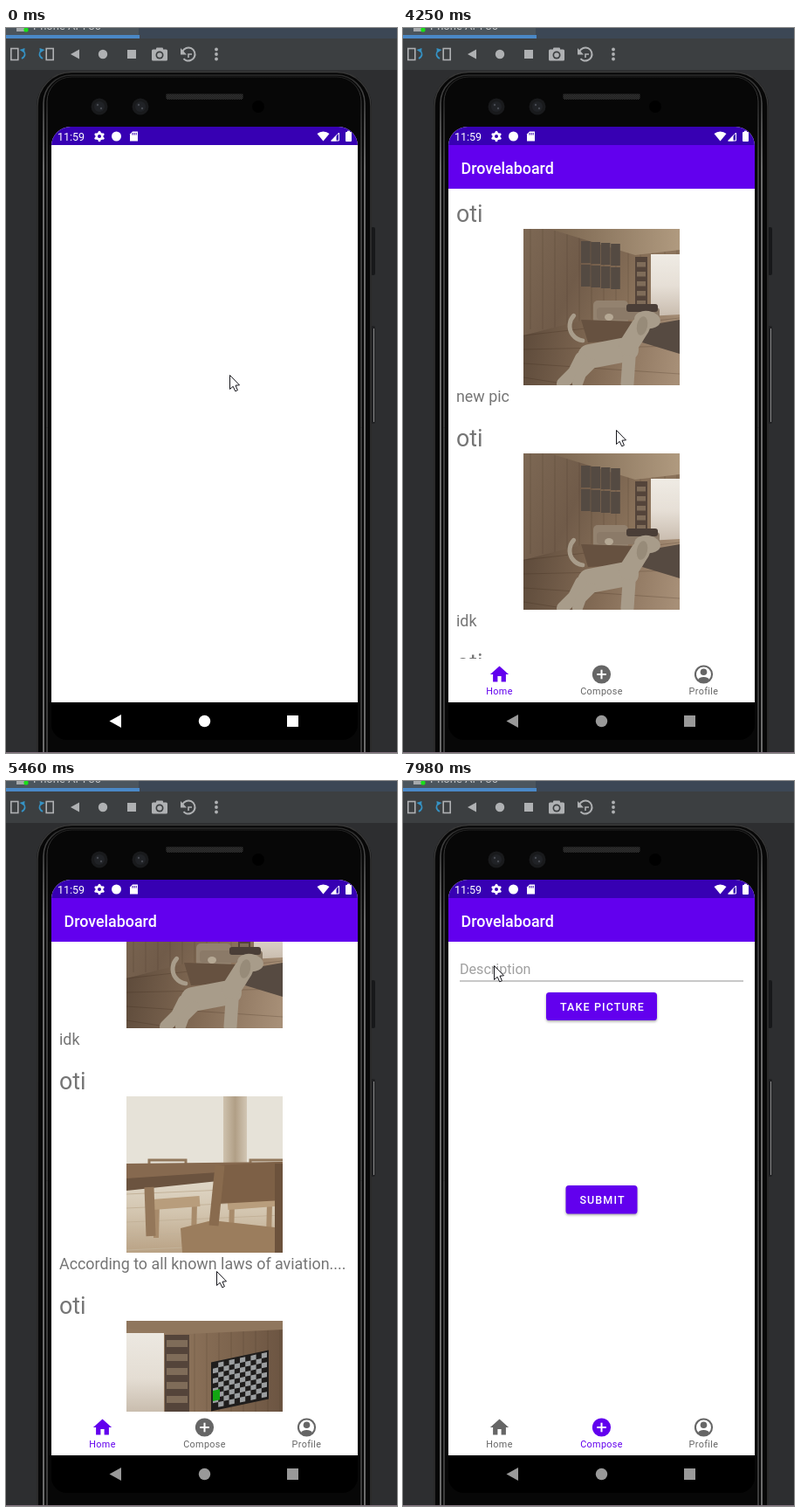
Animation of 448x830 px, one loop 8 s. Source, as an HTML page with a canvas:

```html
<!DOCTYPE html>
<html lang="en">
<head>
<meta charset="utf-8">
<title>Phone feed</title>
<style>
html, body { margin: 0; width: 100%; height: 100%; overflow: hidden; background: #2d2e30; }
canvas { display: block; width: 448px; height: 830px; }
</style>
</head>
<body>
<canvas id="stage" width="448" height="830"></canvas>
<script>
const ctx = document.getElementById('stage').getContext('2d');
const LOOP = 8000, TICK = 121;
const PURPLE = '#6200ee', DARK_PURPLE = '#3700b3', GREY = '#666666', WHITE = '#ffffff';
const APP_NAME = 'Drovelaboard', USER = 'oti';
const PHOTO = 179, POST_GAP = 257;

// Each glide starts at a time and reaches its goal in a few hard ticks; ease > 1 slows to a stop.
const pointerGlides = [
  { at: 120, ticks: 2, to: [327, 614], ease: 2 },
  { at: 390, ticks: 2, to: [306, 644] },
  { at: 3590, ticks: 2, to: [240, 600] },
  { at: 4250, ticks: 5, to: [252, 212], ease: 2 },
  { at: 4860, ticks: 8, to: [234, 770] },
  { at: 5820, ticks: 2, to: [234, 751] },
  { at: 6960, ticks: 6, to: [106, 189] },
  { at: 7840, ticks: 2, to: [104, 211] }
];
const scrollGlides = [
  { at: 4370, ticks: 4, to: [376], ease: 1.7 },
  { at: 4860, ticks: 1, to: [383] }
];

function follow(glides, start, t) {
  return glides.reduce((from, { at, ticks, to, ease = 1 }) => {
    if (t < at) return from;
    const part = Math.min(1, (Math.floor((t - at) / TICK) + 1) / ticks);
    const p = 1 - (1 - part) ** ease;
    return from.map((v, i) => Math.round(v + (to[i] - v) * p));
  }, start);
}

function rect(x, y, w, h, color) {
  ctx.fillStyle = color;
  ctx.fillRect(x, y, w, h);
}
function round(x, y, w, h, r, color) {
  ctx.fillStyle = color;
  ctx.beginPath();
  ctx.roundRect(x, y, w, h, r);
  ctx.fill();
}
function oval(x, y, rx, ry, color, tilt = 0) {
  ctx.fillStyle = color;
  ctx.beginPath();
  ctx.ellipse(x, y, rx, ry, tilt, 0, 7);
  ctx.fill();
}
const disc = (x, y, r, color) => oval(x, y, r, r, color);
function trace(points) {
  ctx.beginPath();
  for (let i = 0; i < points.length; i += 2) ctx.lineTo(points[i], points[i + 1]);
}
function poly(color, ...points) {
  ctx.fillStyle = color;
  trace(points);
  ctx.closePath();
  ctx.fill();
}
function line(color, width, ...points) {
  ctx.strokeStyle = color;
  ctx.lineWidth = width;
  trace(points);
  ctx.stroke();
}
function arc(x, y, r, from, to, width, color) {
  ctx.strokeStyle = color;
  ctx.lineWidth = width;
  ctx.beginPath();
  ctx.arc(x, y, r, from, to);
  ctx.stroke();
}
function text(str, x, y, size, color, { weight = 400, spacing = 0, align = 'left' } = {}) {
  ctx.font = `${weight} ${size}px Roboto, sans-serif`;
  ctx.letterSpacing = spacing + 'px';
  ctx.textAlign = align;
  ctx.fillStyle = color;
  ctx.fillText(str, x, y);
}
function gradient(x0, y0, x1, y1, ...colors) {
  const g = ctx.createLinearGradient(x0, y0, x1, y1);
  colors.forEach((c, i) => g.addColorStop(i / (colors.length - 1), c));
  return g;
}
function clipped(x, y, w, h, draw, r = 0) {
  ctx.save();
  ctx.beginPath();
  ctx.roundRect(x, y, w, h, r);
  ctx.clip();
  draw();
  ctx.restore();
}
function shifted(x, y, draw, flip = 1) {
  ctx.save();
  ctx.translate(x, y);
  ctx.scale(flip, 1);
  draw();
  ctx.restore();
}

function rotateIcon() {
  ctx.strokeStyle = '#aeb0b2';
  ctx.lineWidth = 1.6;
  ctx.strokeRect(-8.2, -6.5, 8, 13);
  arc(2.5, 0, 5, -1.1, 1.3, 1.8, '#3592c4');
  poly('#3592c4', 1.5, -5, 7.5, -7, 7, -1.5);
}

function drawToolbar() {
  const ink = '#afb1b3', bar = '#3c3f41';
  rect(0, 0, 448, 12, '#3c4755');
  rect(0, 0, 152, 8, '#4b555d');
  rect(0, 12, 448, 36, bar);
  rect(0, 8, 153, 4, '#4a88c7');
  rect(12, 0, 9, 4, '#a5a9ac');
  disc(23, 2, 2.6, '#19e019');
  text('Phone API 30', 31, 2, 13, '#c4c6c8');
  shifted(14, 30, rotateIcon);
  shifted(46, 30, rotateIcon, -1);
  poly(ink, 74, 30, 84, 24.5, 84, 35.5);
  disc(111, 30, 5.2, ink);
  rect(139, 25, 10, 10, ink);
  round(167, 24.5, 18, 13, 1.5, ink);
  round(172, 22.5, 8, 4, 1, ink);
  disc(176, 31, 4.5, bar);
  disc(176, 31, 2.8, ink);
  arc(209, 30, 7.5, -2.7, 2.4, 2, ink);
  poly(ink, 200, 23, 200, 30.5, 207, 30.5);
  line(ink, 1.6, 209, 34, 209, 30, 213, 30);
  for (let i = -1; i <= 1; i++) disc(241, 30 + i * 5.5, 1.9, ink);
}

function drawPhone() {
  rect(0, 48, 448, 782, '#2d2e30');
  round(418, 228, 5, 55, 2, '#17181a');
  round(418, 341, 5, 112, 2, '#202123');
  rect(421, 344, 1, 107, '#8c8c8c');
  round(35, 50, 384, 840, 40, '#070707');
  const rim = (inset, color, width) => {
    ctx.strokeStyle = color;
    ctx.lineWidth = width;
    ctx.beginPath();
    ctx.roundRect(35 + inset, 50 + inset / 2, 384 - inset * 2, 860, 40 - inset);
    ctx.stroke();
  };
  rim(1, '#383838', 1.5);
  rim(8, gradient(0, 50, 0, 160, '#262626', '#606060', '#8c8c8c'), 1.5);
  rim(12, gradient(0, 50, 0, 160, '#1c1c1c', '#505050', '#707070'), 1);

  for (const x of [107, 154]) {
    disc(x, 90, 9.5, '#191a1c');
    disc(x, 90, 6, '#202226');
    disc(x - 2, 88, 1.2, '#474a50');
    disc(x + 2, 92, 1.2, '#474a50');
  }
  disc(289, 90, 7, '#000000');
  round(183, 75, 89, 6.5, 2, '#1b1b1b');
  for (let x = 184; x < 271; x++)
    for (let y = 76; y < 81; y += 2) rect(x, y + x % 2, 1, 1, '#353535');
  round(52, 760, 351, 55, [0, 0, 18, 18], '#000000');
  rect(0, 829, 448, 1, '#82727e');
}

function drawStatusBar() {
  rect(52, 113, 351, 21, DARK_PURPLE);
  text('11:59', 59, 129, 12.5, WHITE);
  disc(107, 124, 4.6, WHITE);
  for (let a = Math.PI / 6; a < 6.5; a += Math.PI / 3)
    disc(107 + 4.7 * Math.cos(a), 124 + 4.7 * Math.sin(a), 1.5, WHITE);
  disc(107, 124, 2, DARK_PURPLE);
  disc(126.5, 124, 5.5, WHITE);
  poly(WHITE, 142, 121.5, 145, 118.5, 151, 118.5, 151, 129.5, 142, 129.5);
  for (let i = 0; i < 3; i++) rect(144.5 + i * 2.1, 120, 1, 2.5, DARK_PURPLE);
  ctx.fillStyle = WHITE;
  ctx.beginPath();
  ctx.moveTo(363.5, 129.5);
  ctx.arc(363.5, 129.5, 11, -2.26, -0.88);
  ctx.fill();
  line(WHITE, 1, 372.8, 129, 381.5, 120, 381.5, 129, 372.8, 129);
  poly(WHITE, 372, 129.5, 378.5, 122.7, 378.5, 129.5);
  round(389, 119, 7, 11, 1, WHITE);
  rect(391, 117.7, 3, 2, WHITE);
}

function planks(left, step) {
  for (let x = left; x < PHOTO; x += step) line('rgba(45,30,18,.16)', 1, x, 0, x, 115);
}
function shelves(x, top, width, step) {
  rect(x, top, width, 92, '#54443a');
  for (let y = top + 6; y < top + 86; y += step) rect(x + 2, y, width - 4, step / 2, '#7f6c59');
}

function dog() {
  const coat = '#a89c8a';
  ctx.lineCap = ctx.lineJoin = 'round';
  arc(70, 111, 17, 1.7, 3.9, 5, coat);
  line(coat, 28, 76, 146, 118, 138);
  line(coat, 14, 66, 148, 58, 164, 45, 177);
  line(coat, 12, 78, 154, 66, 166, 62, 177);
  line(coat, 15, 121, 148, 119, 177);
  line(coat, 22, 120, 134, 134, 112);
  oval(142, 104, 15, 10, coat, 0.15);
  oval(136, 111, 6, 11, '#978b79', 0.2);
  ctx.lineCap = 'butt';
  ctx.lineJoin = 'miter';
}

function dogRoom() {
  rect(0, 0, PHOTO, PHOTO, gradient(0, 0, 140, 60, '#7d6854', '#705b49', '#8b735b'));
  planks(8, 14);
  poly(gradient(40, 0, 179, 0, '#7d6852', '#b09a7f'), 30, 0, 179, 0, 179, 24, 128, 30);
  rect(146, 29, 33, 72, gradient(0, 29, 0, 101, '#efebe4', '#e6dfd6', '#c8bbad'));
  shelves(128, 32, 14, 11);
  for (let i = 0; i < 8; i++)
    rect(66 + i % 4 * 11.4, 14 + (i >> 2) * 27 + i % 4, 10.6, 25, '#544a42');
  poly(gradient(0, 120, 179, 150, '#5e4b3b', '#836b55', '#a78f77'), 0, 122, 70, 104, 179, 98, 179, 179, 0, 179);
  for (let y = 122; y < 230; y += 16) line('rgba(50,34,22,.22)', 1, 0, y, 179, 2 * y - 142);
  poly('#564a41', 145, 110, 179, 104, 179, 143, 136, 130);
  round(80, 82, 40, 28, 5, '#93826f');
  round(84, 90, 72, 14, 4, '#8b7a68');
  round(118, 86, 36, 9, 3, '#4a3e37');
  poly('#665140', 66, 104, 128, 106, 122, 128, 74, 130);
  oval(98, 101, 5, 4, '#b5a894');
  dog();
}

function stool(x, y) {
  for (const dx of [5, 48]) line('#a88b6b', 6, x + dx, y, x + dx - 1, y + 40);
  line('#b89d7c', 12, x, y + 2, x + 54, y - 2);
}

function chairRoom() {
  rect(0, 0, PHOTO, PHOTO, '#e6e2d8');
  rect(111, 0, 27, 90, gradient(111, 0, 138, 0, '#cec2ae', '#b19f86', '#d2c6b4'));
  rect(0, 90, PHOTO, 89, gradient(0, 90, 0, 179, '#e2dacb', '#d2c4ae', '#b9a285'));
  for (let y = 112; y < 179; y += 16) line('#c3b299', 1, 0, y, 179, y - 8);
  for (const x of [26, 142]) line('#92785c', 3, x, 80, x, 73, x + 42, 73, x + 42, 80);
  stool(30, 122);
  stool(116, 122);
  poly('#86694f', 0, 77, 179, 75, 179, 90, 0, 98);
  poly('#6b533f', 0, 94, 105, 87, 105, 97, 0, 108);
  line('#94775a', 11, 26, 104, 28, 160);
  poly('#9b7d5d', 62, 151, 98, 142, 179, 151, 179, 179, 64, 179);
  line('#7d6046', 44, 104, 101, 179, 97);
  line('#896b4e', 11, 107, 79, 100, 148);
  line('#6c523c', 10, 175, 77, 175, 179);
}

function checkers(x, y, cols, rows) {
  shifted(x, y, () => {
    ctx.transform(1, -0.21, 0, 1, 0, 0);
    rect(-2, -2, 66, 56, '#1f1d1c');
    const w = 62 / cols, h = 51 / rows;
    for (let i = 0; i < cols * rows; i++) {
      const c = i % cols, r = Math.floor(i / cols);
      if ((c + r) % 2) rect(c * w, r * h, w, h, '#9b9ea0');
    }
    rect(0, 31, 8, 12, '#12a512');
  });
}

function tvRoom() {
  rect(0, 0, PHOTO, PHOTO, gradient(40, 0, 179, 0, '#92785f', '#806750', '#6c5542'));
  planks(78, 14);
  poly('#8f765d', 0, 0, 179, 0, 179, 10, 72, 15, 0, 9);
  rect(0, 14, 43, 104, gradient(0, 14, 0, 118, '#ece8e1', '#e4ddd3', '#bfb1a0'));
  shelves(44, 16, 28, 16);
  checkers(99, 49, 10, 9);
}

const POSTS = [
  [dogRoom, 'new pic'], [dogRoom, 'idk'],
  [chairRoom, 'According to all known laws of aviation....'], [tvRoom, '']
];

function drawFeed(t) {
  if (t < 2630) return;
  const [scroll] = follow(scrollGlides, [0], t);
  clipped(52, 184, 351, 538, () => POSTS.forEach(([photo, caption], i) => {
    const top = 230 + i * POST_GAP - scroll;
    text(USER, 61, top - 8, 26.8, '#757575');
    text(caption, 61, top + 197.5, 17.86, '#757575');
    if (t >= 2750) clipped(138, top, PHOTO, PHOTO, () => shifted(138, top, photo));
  }));
}

function button(label, x, y, w, h) {
  ctx.save();
  ctx.shadowColor = 'rgba(0,0,0,.35)';
  ctx.shadowBlur = 3;
  ctx.shadowOffsetY = 1.5;
  round(x, y, w, h, 3.6, PURPLE);
  ctx.restore();
  text(label, x + w / 2 + 1, y + h / 2 + 4.5, 12.5, WHITE, { weight: 500, spacing: 1.12, align: 'center' });
}

function drawComposer() {
  text('Description', 65, 221, 16.1, '#a0a0a0');
  rect(65, 228.5, 325, 1, '#929292');
  button('TAKE PICTURE', 164, 242, 127, 32);
  button('SUBMIT', 186.5, 463, 82, 32.5);
}

const TABS = {
  Home(color) {
    poly(color, -10.6, 0, 0, -9.5, 10.6, 0, 7.4, 0, 7.4, 8.5, -7.4, 8.5, -7.4, 0);
    rect(-2.1, 2, 4.2, 7, WHITE);
  },
  Compose(color) {
    disc(0, 0, 10.6, color);
    rect(-5.3, -1, 10.6, 2, WHITE);
    rect(-1, -5.3, 2, 10.6, WHITE);
  },
  Profile(color) {
    disc(0, 0, 10.6, color);
    disc(0, 0, 8.5, WHITE);
    disc(0, -2.8, 3.8, color);
    oval(0, 6.3, 6.4, 3.3, color);
  }
};

function drawRipple(t) {
  const step = Math.floor((t - 6190) / TICK);
  if (step < 0 || step > 2) return;
  const alpha = 0.165 * (1 - Math.abs(step - 1) / 2);
  clipped(52, 722, 351, 50, () => disc(228, 747, 63 * Math.min(1, 0.7 + step * 0.3), `rgba(0,0,0,${alpha})`));
}

function drawTabs(t) {
  const active = t < 6310 ? 'Home' : 'Compose';
  rect(52, 722, 351, 50, WHITE);
  drawRipple(t);
  Object.entries(TABS).forEach(([label, icon], i) => {
    const x = 110.5 + i * 117, color = label === active ? PURPLE : GREY;
    shifted(x, 740, () => icon(color));
    text(label, x, 763, 10.8, color, { spacing: 0.36, align: 'center' });
  });
}

function drawSystemNav(t) {
  const color = t < 2250 ? WHITE : '#999999';
  poly(color, 118.5, 793.5, 132, 786, 132, 801);
  disc(227.5, 793.5, 6.7, color);
  rect(322, 787, 13, 13, color);
}

function drawPointer(t) {
  const [x, y] = follow(pointerGlides, [256, 397], t);
  shifted(x + 0.5, y + 0.5, () => {
    poly(WHITE, 0, 0, 0, 16, 3.7, 12.8, 6.2, 18.3, 8.9, 17.2, 6.5, 11.7, 11, 11.3);
    ctx.strokeStyle = '#16161c';
    ctx.lineWidth = 1;
    ctx.stroke();
  });
}

function drawApp(t) {
  rect(52, 113, 351, 659, WHITE);
  drawStatusBar();
  if (t < 2510) return;
  if (t < 6430) drawFeed(t);
  else drawComposer();
  rect(52, 134, 351, 50, PURPLE);
  text(APP_NAME, 66.5, 166.5, 17.86, WHITE, { weight: 500 });
  drawTabs(t);
}

function draw(t) {
  drawToolbar();
  drawPhone();
  clipped(52, 113, 351, 659, () => drawApp(t), [22, 22, 0, 0]);
  drawSystemNav(t);
  drawPointer(t);
}

function tick() {
  draw(performance.now() % LOOP);
  requestAnimationFrame(tick);
}
tick();
</script>
</body>
</html>
```
